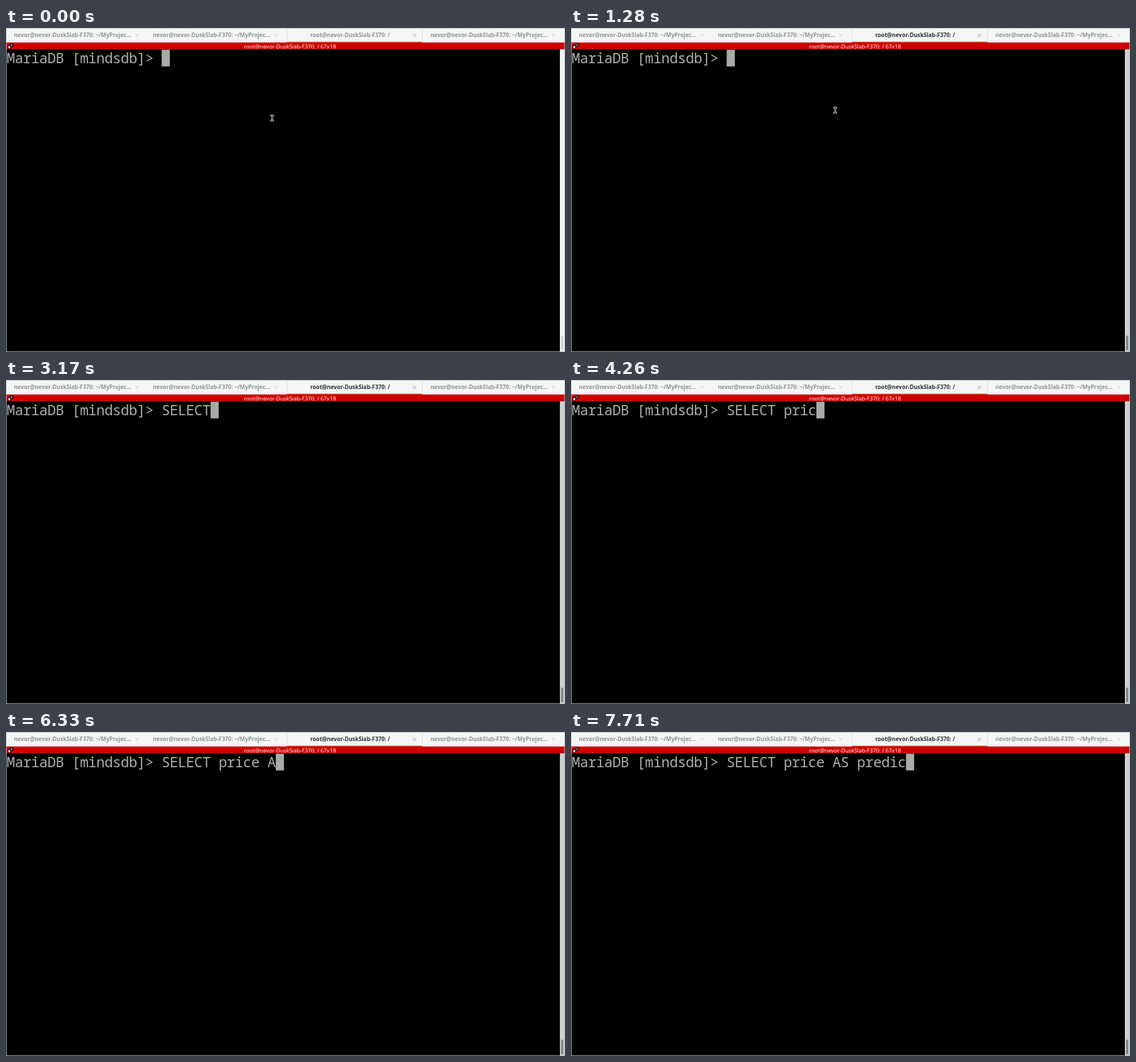
Animation, 982 px wide and 570 px high, one loop 8000 ms. Source, as an HTML page with a canvas:

```html
<!DOCTYPE html>
<html lang="en">
<head>
<meta charset="utf-8">
<title>Terminal session</title>
<style>
  html, body { margin: 0; width: 100%; height: 100%; overflow: hidden; background: #000; }
  canvas { display: block; }
</style>
</head>
<body>
<canvas id="stage" width="982" height="570"></canvas>
<script>
const ctx = document.getElementById('stage').getContext('2d');
const LOOP = 8000;
const CELL = 14.32, LEFT = 1.4;
const HOST = 'nevor-DuskSlab-F370';
const PROMPT = 'MariaDB [mindsdb]> ';
const TYPED = 'SELECT price AS predic';
const KEY_TIMES = [
  1880, 2180, 2370, 2570, 2870, 3170, 3470,
  3770, 3960, 4060, 4260, 4550, 4650,
  6330, 6530, 6830,
  7130, 7210, 7310, 7510, 7610, 7710
];
const BLINK_OFF = [[740, 1280], [5250, 5840]];
const TABS = [
  { x: 117, close: 230.5, label: `nevor@${HOST}: ~/MyProjec...` },
  { x: 361, close: 474, label: `nevor@${HOST}: ~/MyProjec...` },
  { x: 604.5, close: 717.5, label: `root@${HOST}: /`, active: true },
  { x: 848.5, close: 962, label: `nevor@${HOST}: ~/MyProjec...` }
];

function rect(x, y, w, h, color) {
  ctx.fillStyle = color;
  ctx.fillRect(x, y, w, h);
}

function text(str, x, y, font, color) {
  ctx.font = font;
  ctx.fillStyle = color;
  ctx.fillText(str, x, y);
}

function strokePath(segments, width, color) {
  ctx.lineWidth = width;
  ctx.strokeStyle = color;
  ctx.beginPath();
  for (const [x1, y1, x2, y2] of segments) {
    ctx.moveTo(x1, y1);
    ctx.lineTo(x2, y2);
  }
  ctx.stroke();
}

function drawTabs(focused) {
  rect(0, 0, 982, 26, '#f5f6f6');
  rect(0, 0, 982, 1, '#c8c8c8');
  rect(493, 1, 1, 25, '#dcdcdc');
  rect(731, 1, 1, 25, '#dcdcdc');
  rect(494, 24, 237, 2, focused ? '#e2622f' : '#e67a50');
  for (const { x, close, label, active } of TABS) {
    const lit = active && focused;
    text(label, x, 16.2, 'bold 9.75px "Open Sans", sans-serif', lit ? '#2e3436' : '#929595');
    const r = 2.5;
    strokePath([[close - r, 13 - r, close + r, 13 + r], [close - r, 13 + r, close + r, 13 - r]], 1,
      lit ? '#9a9c9c' : active ? '#b4b6b6' : '#cfd1d1');
  }
}

function drawTitle() {
  rect(0, 25.5, 982, 12, '#cc0000');
  rect(7, 27.5, 5.5, 5.5, '#000');
  rect(8, 28.5, 3.5, 3.5, '#3b78b0');
  rect(3, 31, 5.5, 5.5, '#000');
  rect(4, 32, 3.5, 3.5, '#e8e8e8');
  text(`root@${HOST}: / 67x18`, 499, 35.5, '9.7px "Open Sans", sans-serif', '#fff');
}

function drawScrollbar(t) {
  const [trough, thumb] = t < 230 ? ['#f3f3f3', '#d4d4d4']
    : t < 410 ? ['#dedede', '#aaaaaa'] : ['#cfcfcf', '#868686'];
  rect(973, 37.5, 8.5, 532, trough);
  ctx.fillStyle = thumb;
  ctx.beginPath();
  ctx.roundRect(975, 541, 4, 26, 2);
  ctx.fill();
}

function drawPrompt(t) {
  const line = PROMPT + TYPED.slice(0, KEY_TIMES.filter(k => k <= t).length);
  [...line].forEach((ch, i) =>
    text(ch, LEFT + (i + 0.5) * CELL, 62, '25px "Noto Sans Mono", monospace', '#aaaaaa'));
  if (!BLINK_OFF.some(([from, to]) => t >= from && t < to)) {
    rect(LEFT + line.length * CELL, 38.2, CELL, 29.4, '#aaaaaa');
  }
}

function drawPointer(t) {
  if (t >= KEY_TIMES[0]) return;
  const [x, y] = t < 740 ? [467.5, 158.5] : t < 1180 ? [463.5, 143.5] : [464, 144.5];
  const beam = [[x - 1.5, y - 4.5, x + 1.5, y - 4.5], [x, y - 4.5, x, y + 4.5],
    [x - 1.5, y + 4.5, x + 1.5, y + 4.5]];
  strokePath(beam, 3, '#d0d0d0');
  strokePath(beam, 1, '#151515');
}

function draw() {
  const t = performance.now() % LOOP;
  ctx.textAlign = 'center';
  ctx.lineCap = 'square';
  rect(0, 0, 982, 570, '#000');
  drawTabs(t >= 230);
  drawTitle();
  drawScrollbar(t);
  drawPrompt(t);
  drawPointer(t);
  rect(0, 0, 1, 570, '#b8b8b8');
  rect(981, 0, 1, 570, '#b8b8b8');
  rect(0, 569, 982, 1, '#b8b8b8');
  requestAnimationFrame(draw);
}
draw();
</script>
</body>
</html>
```
